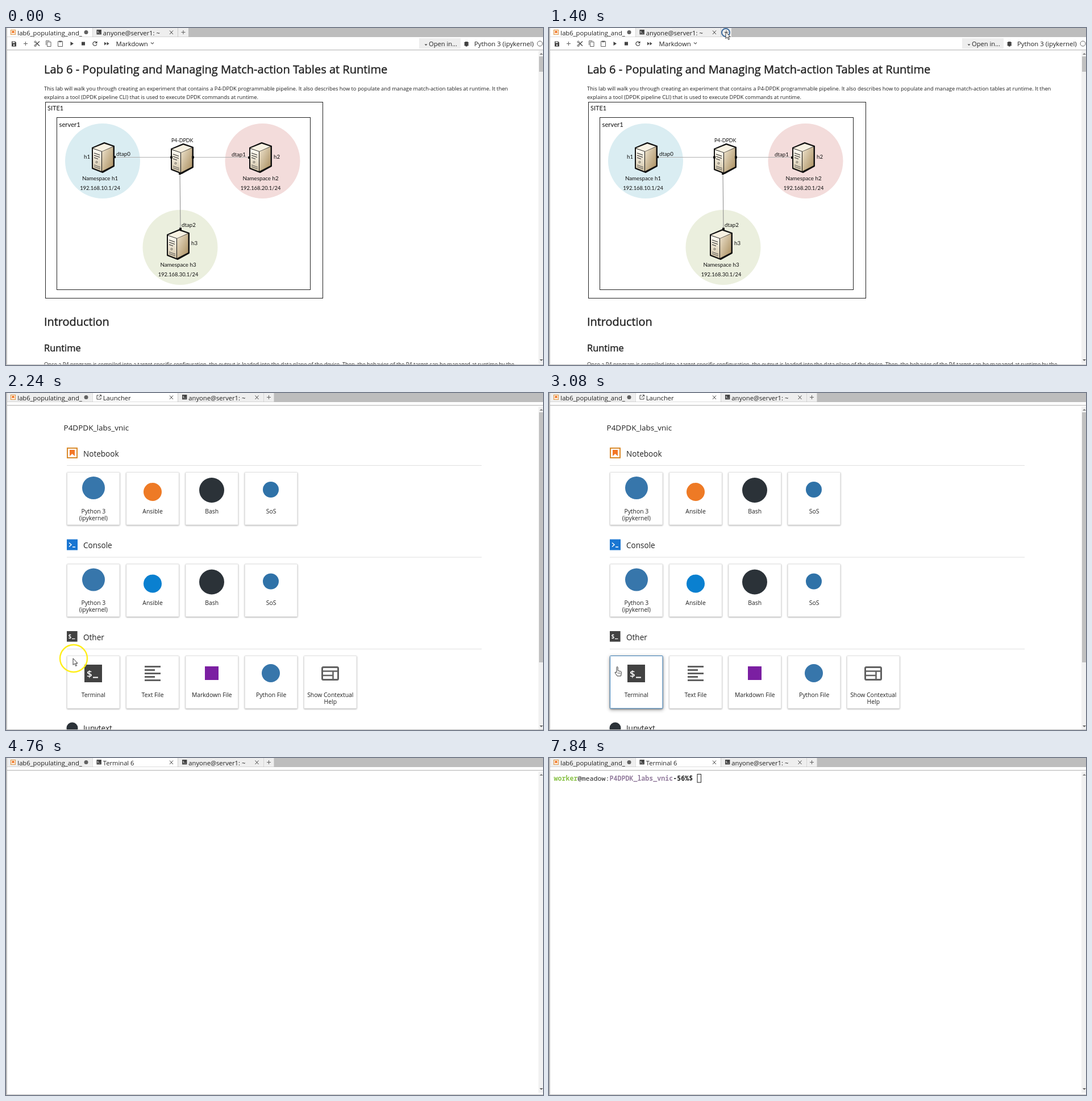
An HTML page for the animation above (7940 ms loop, 945 px wide and 593 px high).

```html
<!DOCTYPE html>
<html lang="en">
<head>
<meta charset="utf-8">
<title>Opening a terminal</title>
<style>
  html, body { margin: 0; width: 100%; height: 100%; overflow: hidden; background: #fff; }
  svg { display: block; width: 100%; height: 100%; }
  text { font-family: "Open Sans", "Noto Sans", sans-serif; fill: #212121; white-space: pre; }
  .medium { stroke: #212121; stroke-width: .4px; }
  .diagram text { font-family: Lato, "Open Sans", sans-serif; fill: #111; }
  .prompt { font-family: "Noto Sans Mono", "DejaVu Sans Mono", monospace; font-size: 11.67px; }
  .tile { filter: drop-shadow(0 1px 1px rgba(0,0,0,.3)); }
  .hover { filter: drop-shadow(0 2px 3px rgba(0,0,0,.4)); }
</style>
</head>
<body>
<svg id="stage" viewBox="0 0 945 593" preserveAspectRatio="none">
  <defs>
    <linearGradient id="side" x2="1" y2="1">
      <stop offset="0" stop-color="#eee4cf"/><stop offset="1" stop-color="#a88c5c"/>
    </linearGradient>
    <linearGradient id="front" x2="0" y2="1">
      <stop offset="0" stop-color="#fffdf6"/><stop offset="1" stop-color="#d2c4a6"/>
    </linearGradient>
  </defs>
</svg>
<script>
const LOOP = 7940, STEP = 140;
const stage = document.getElementById('stage');

const text = (x, y, size, label, attrs = '') =>
  `<text x="${x}" y="${y}" font-size="${size}" ${attrs}>${label}</text>`;
const rect = (x, y, w, h, fill, attrs = '') =>
  `<rect x="${x}" y="${y}" width="${w}" height="${h}" fill="${fill}" ${attrs}/>`;
const circle = (x, y, r, fill, attrs = '') =>
  `<circle cx="${x}" cy="${y}" r="${r}" fill="${fill}" ${attrs}/>`;
const shape = (d, fill, attrs = '') => `<path d="${d}" fill="${fill}" ${attrs}/>`;
const line = (d, color = '#616161', width = 1, attrs = '') =>
  shape(d, 'none', `stroke="${color}" stroke-width="${width}" ${attrs}`);
const at = (x, y, body, scale = 1) => `<g transform="translate(${x} ${y}) scale(${scale})">${body}</g>`;
const group = (id, body) => `<g id="${id}" display="none">${body}</g>`;

// Icons, each drawn from its top left corner
const bookIcon = rect(1, 1, 17, 17, '#fff', 'stroke="#d98a2b" stroke-width="2"') +
  shape('M5 4h9v11l-4.500-4-4.500 4z', '#f37726');
const shellIcon = rect(0, 0, 31, 31, '#424242') +
  text(4, 22, 17, '$', 'style="fill:#fff" font-weight="600"') + line('M15 22.500h9', '#fff', 2);
const consoleIcon = rect(0, 0, 19, 19, '#1976d2') +
  line('M4 6l4 3.500-4 3.500M10 13.500h5', '#fff', 1.500);
const launchIcon = line('M3.500 1H.5v7h7V5M5 .5h3v3M8 .5L3.500 5', '#424242');

// Tab strip
const cross = x => line(`M${x - 3} 4.500l6 6.500m0-6.500l-6 6.500`, '#424242');
const plus = (x, y, r) => line(`M${x - r} ${y}h${2 * r}M${x} ${y - r}v${2 * r}`, '#616161');

function tab(index, label, active, icon) {
  const x = 2 + index * 150.5;
  return rect(x, 0, 150, 15.500, active ? '#fff' : '#eee') +
    line(`M${x + 150.5} 0v15.500`, '#bdbdbd') +
    at(x + (index ? 7 : 6), 3, icon) +
    text(x + 18.3, 12.500, 11.2, label) +
    (index ? cross(x + 138.500) : circle(141, 7.500, 3.500, '#616161'));
}

function frame(tabs, lineY) {
  const x = 2 + tabs.length * 150.500;
  return rect(0, 0, 945, 593, '#fff') + rect(0, 0, 945, 16, '#bdbdbd') +
    tabs.map((t, i) => tab(i, ...t)).join('') +
    rect(x, 0, 18, 15.500, '#eee') + plus(x + 9, 7.500, 3.500) +
    rect(0, 0, 2, 593, '#bdbdbd') +
    rect(2, lineY - .5, 943, 1, '#bdbdbd') + rect(2, lineY + .5, 943, 1, '#eee');
}

function scrollbar(top, bottom, thumbTop, thumbHeight) {
  return rect(937, top, 8, bottom - top, '#f1f1f1') +
    (thumbHeight ? rect(938, thumbTop, 7, thumbHeight, '#c1c1c1') : '') +
    shape(`M939 ${top + 7}l3-3 3 3z`, '#808080') + shape(`M939 ${bottom - 8}l3 3 3-3z`, '#606060') +
    rect(2, 592, 943, 1, '#bdbdbd');
}

const smallBook = at(0, 0, bookIcon, .47);
const smallShell = at(0, 0, shellIcon, .27);
const notebookTab = active => ['lab6_populating_and_', active, smallBook];
const serverTab = ['anyone@server1: ~', false, smallShell];

// Notebook view
const toolbar = [
  shape('M10 23.500h6l2 2v7h-8z', '#424242') + rect(11.500, 24.500, 4, 2, '#fff') + circle(14, 30, 1.300, '#fff'),
  plus(34.500, 27.500, 3.500),
  line('M51 24l8 7.500M51 31l8-7.500', '#424242', 1.300) +
    circle(51.500, 24.500, 1.500, '#fff', 'stroke="#424242"') + circle(51.500, 31, 1.500, '#fff', 'stroke="#424242"'),
  line('M70.500 30v-7.500h6M72.500 24.500h6.500v8h-6.500z'),
  line('M91.500 23.500h8v9h-8z') + rect(93, 22.500, 5, 2.500, '#616161'),
  shape('M113.500 24l5.500 3.500-5.500 3.500z', '#424242'),
  rect(133, 24.500, 6, 6, '#424242'),
  line('M159 25.300a3.500 3.500 0 1 0 .8 3', '#424242', 1.200) + shape('M160.500 23v4h-4z', '#424242'),
  shape('M173 24.500l4 3-4 3zM177.500 24.500l4 3-4 3z', '#424242'),
  text(193.500, 32, 11.35, 'Markdown'),
  line('M255 25.500l2.500 2.500 2.500-2.500', '#616161', 1.200),
  rect(727, 18, 73, 18.500, '#eee'),
  shape('M736.500 28.500h5l-2.500 2.500z', '#424242'),
  text(744, 32, 11.15, 'Open in...'),
  shape('M808 24h4.500l1 2v4l-2 2.500h-2.500l-2-2.500v-4z', '#424242') +
    line('M806 25.500h8.500M806 28h8.500M806 30.500h8.500', '#424242', .8),
  text(824, 32, 11.35, 'Python 3 (ipykernel)'),
  circle(939.500, 27.500, 4.500, 'none', 'stroke="#616161"')
].join('');

const server = (x, y) => at(x, y,
  shape('M0 9L21 0 38 6V41L18 52 0 45Z', '#111', 'stroke="#111" stroke-width="2" stroke-linejoin="round"') +
  shape('M1 9.500L21 1.500 36 6.500 17 15Z', '#f7f1e2') +
  shape('M17 15.500L36.500 7V40L17 50Z', 'url(#side)') +
  shape('M1 10.500L16 15.500V50L1 44Z', 'url(#front)') +
  line('M3 18l10 3.500M3 22l10 3.500M3 26l7 2.500', '#333', 1.300) +
  line('M3 39l11 4M3 42l11 4', '#555', 1) + circle(7.500, 34, 1.500, '#e7dcc4', 'stroke="#333" stroke-width=".7"'));

const namespace = (x, y, n, fill) => circle(x, y, 66, fill);
const address = (x, y, n) =>
  text(x, y, 9.75, `Namespace h${n}`, 'text-anchor="middle"') +
  text(x, y + 17, 9.4, `192.168.${n}0.1/24`, 'text-anchor="middle"');

const diagram = `<g class="diagram">` +
  rect(69.500, 130.500, 488, 345, '#fff', 'stroke="#222"') +
  rect(89.500, 157.500, 446, 303, '#fff', 'stroke="#222"') +
  circle(170, 234, 66, '#daedf2') + circle(451.500, 234, 66, '#f3dcdb') + circle(306.500, 386, 66, '#ebefde') +
  line('M190 227.500H291M328 227.500H429', '#b0b0b0') + line('M306 256L307 353', '#888') +
  server(152, 202) + server(291, 204) + server(429, 202) + server(284, 355) +
  [[191, 227], [291, 227.500], [329, 227.500], [428, 228], [306, 256], [307, 353.500]]
    .map(([x, y]) => rect(x - 2, y - 2, 4, 4, '#111')).join('') +
  text(73, 145, 10.9, 'SITE1') + text(93.500, 173.500, 11.3, 'server1') +
  text(137, 230, 9.7, 'h1') + text(194, 225, 9.7, 'dtap0') + text(291, 201, 8.9, 'P4-DPDK') +
  text(397, 226, 9.7, 'dtap1') + text(471, 230, 9.7, 'h2') +
  text(309, 350, 9.7, 'dtap2') + text(326, 382, 9.7, 'h3') +
  address(165.500, 268, 1) + address(448, 268, 2) + address(303, 420, 3) + '</g>';

const notebook = frame([notebookTab(true), serverTab], 38.500) + toolbar +
  text(67, 80, 20.05, 'Lab 6 - Populating and Managing Match-action Tables at Runtime', 'class="medium"') +
  text(67, 110, 9.32, 'This lab will walk you through creating an experiment that contains a P4-DPDK programmable pipeline. It also describes how to populate and manage match-action tables at runtime. It then') +
  text(67, 125, 9.32, 'explains a tool (DPDK pipeline CLI) that is used to execute DPDK commands at runtime.') +
  diagram +
  text(67, 524, 19.9, 'Introduction', 'class="medium"') +
  text(67, 568.500, 16.4, 'Runtime', 'class="medium"') +
  text(67, 595, 9.32, 'Once a P4 program is compiled into a target-specific configuration, the output is loaded into the data plane of the device. Then, the behavior of the P4 target can be managed at runtime by the') +
  scrollbar(40, 591, 50, 27);

// Launcher view
function tile(column, y, icon, ...labels) {
  const x = 107.500 + column * 104.25;
  return rect(x, y + .5, 92.500, 92.500, '#fff', 'class="tile" stroke="#e0e0e0" rx="1"') + icon +
    labels.map((label, i) => text(x + 46.300, y + 72.500 + i * 12, 10.4, label, 'text-anchor="middle"')).join('');
}

const section = (y, icon, title) => at(107, y - 10, icon) + text(136, y + 5.500, 13.55, title) +
  rect(107, y + 21, 730, 1, '#e0e0e0');

const kernels = (y, accent) =>
  tile(0, y, circle(154, y + 28, 20, '#3776ab'), 'Python 3', '(ipykernel)') +
  tile(1, y, circle(258, y + 35, 16, accent), 'Ansible') +
  tile(2, y, circle(362, y + 32, 22, '#2b3238'), 'Bash') +
  tile(3, y, circle(466, y + 31, 14, '#2f72a8'), 'SoS');

const textFileIcon = line('M244 481.500h28M244 487.500h18M244 493.500h28M244 499.500h18M244 505.500h28', '#616161', 3);
const helpIcon = rect(556.500, 482.500, 28, 22, '#fff', 'rx="2" stroke="#616161" stroke-width="3"') +
  line('M557 489.500h28M557 497h18M575.500 490v15', '#616161', 2.500);

const launcher = frame([notebookTab(false), ['Launcher', true, launchIcon], serverTab], 21.500) +
  text(101.500, 66, 13.5, 'P4DPDK_labs_vnic') +
  section(106, bookIcon, 'Notebook') + kernels(139, '#ee7a25') +
  section(267.500, consoleIcon, 'Console') + kernels(300.500, '#0a80d0') +
  section(429, at(0, 0, shellIcon, .6), 'Other') +
  tile(0, 462, '', 'Terminal') +
  group('hover', rect(107.500, 462.500, 92.500, 92.500, '#fff', 'class="hover" stroke="#3a7fb8" rx="1"') +
    text(153.800, 534.500, 10.4, 'Terminal', 'text-anchor="middle"')) +
  at(138, 478, shellIcon) +
  tile(1, 462, textFileIcon, 'Text File') +
  tile(2, 462, rect(350, 481, 24, 24, '#7b1fa2'), 'Markdown File') +
  tile(3, 462, circle(466, 493, 16, '#3776ab'), 'Python File') +
  tile(4, 462, helpIcon, 'Show Contextual', 'Help') +
  circle(116.500, 589.500, 10, '#2b3238') + text(136, 595, 13.55, 'Jupytext') +
  scrollbar(24, 593, 34, 440);

// Terminal view
const prompt = `<text class="prompt" x="8.500" y="40"><tspan fill="#8bc34a" font-weight="700">worker</tspan>` +
  `<tspan font-weight="500">@meadow:</tspan><tspan fill="#957f9f" font-weight="700">P4DPDK_labs_vnic</tspan>` +
  `<tspan font-weight="600">-56%$</tspan></text>`;

const terminal = frame([notebookTab(false), ['Terminal 6', true, smallShell], serverTab], 21.500) +
  scrollbar(24, 589, 0, 0) +
  group('prompt', prompt) +
  group('block', rect(0, 28, 7, 15.500, '#212121')) +
  group('outline', rect(261, 28.500, 6.500, 14.500, '#fff', 'stroke="#212121"'));

// Pointer, drawn with its tip at 0,0
const pointer = group('pointer',
  group('halo', circle(1, 0, 24, 'none', 'stroke="#ffee1a" stroke-width="2.500"')) +
  group('click', circle(0, 1, 7, 'none', 'stroke="#3f6d9e" stroke-width="2"')) +
  group('arrow', shape('M0 0V11.500L2.700 9 4.700 13.500 6.500 12.700 4.600 8.500H8Z', '#fff', 'stroke="#222" stroke-width=".9"')) +
  group('hand', shape('M-1 0Q0-2 1.200 0V6L6.500 7.500Q8 8 7.500 10L6.500 15.500H0L-4 9.500Q-3.500 7.500-1 9.500Z', '#fff',
    'stroke="#222" stroke-width=".9" stroke-linejoin="round"') + line('M1.500 9v3M3.500 9v3M5.300 9v3', '#222', .6)) +
  group('beam', line('M-2.500 0h5M0 0v13M-2.500 13h5', '#222')));

stage.insertAdjacentHTML('beforeend',
  group('notebook', notebook) + group('launcher', launcher) + group('terminal', terminal) + pointer);

// Pointer stops: time, x, y
const route = [[140, 470, 575], [1120, 311, 7], [1540, 311, 7], [2240, 118, 467], [2800, 118, 467], [3360, 122, 498], [LOOP, 122, 498]];

// Spans of time during which each part is visible
const spans = {
  notebook: [[0, 1680]], launcher: [[1680, 4200]], terminal: [[4200, LOOP]],
  pointer: [[140, 4620]], arrow: [[0, 3080]], hand: [[3080, 4200]], beam: [[4200, 4620]],
  halo: [[1820, 2520]], click: [[1260, 1680], [3500, 3640]], hover: [[3080, 4200]],
  prompt: [[6720, LOOP]], block: [[4200, 4760], [5320, 5880], [6580, 7280]], outline: [[7840, LOOP]]
};
const parts = Object.fromEntries(Object.keys(spans).map(id => [id, document.getElementById(id)]));

function position(time) {
  const i = Math.max(1, route.findIndex(stop => stop[0] > time));
  const [t0, x0, y0] = route[i - 1], [t1, x1, y1] = route[i];
  const u = Math.max(0, (time - t0) / (t1 - t0));
  const ease = u * u * (3 - 2 * u);
  return [x0 + (x1 - x0) * ease, y0 + (y1 - y0) * ease];
}

function render(now) {
  const time = Math.floor((now % LOOP) / STEP) * STEP;
  for (const id in spans) {
    const visible = spans[id].some(([from, to]) => time >= from && time < to);
    parts[id].setAttribute('display', visible ? 'inline' : 'none');
  }
  parts.pointer.setAttribute('transform', `translate(${position(time)})`);
  parts.block.setAttribute('transform', `translate(${time < 6720 ? 8.5 : 260.5} 0)`);
}

const start = performance.now();
function tick() {
  render(performance.now() - start);
  requestAnimationFrame(tick);
}
tick();
</script>
</body>
</html>
```
